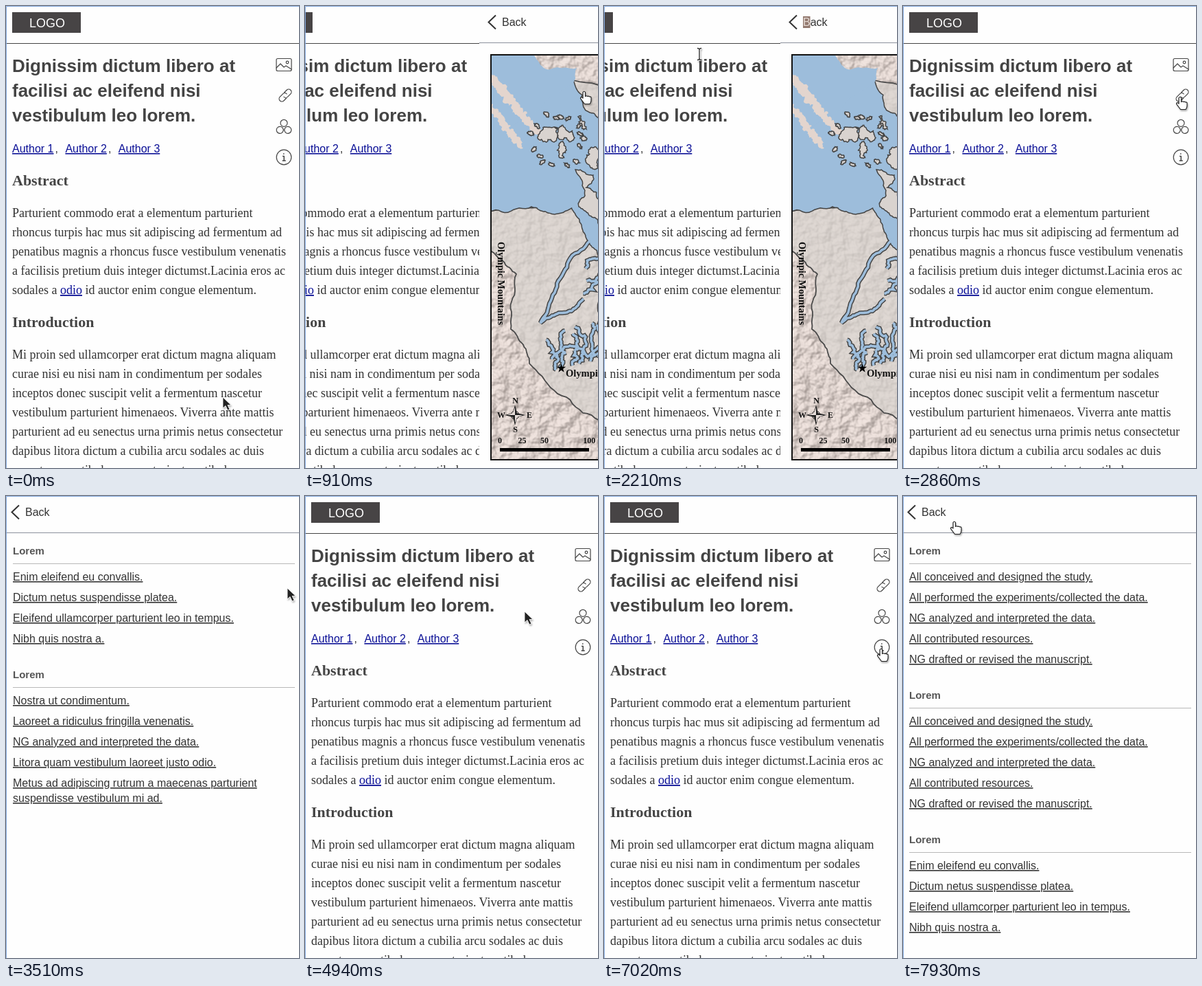
An HTML page that plays this animation: 427 px wide and 672 px high, repeating every 8 s.

```html
<!DOCTYPE html>
<html lang="en">
<head>
<meta charset="utf-8">
<title>Article side panels</title>
<style>
html, body { margin: 0; width: 100%; height: 100%; overflow: hidden; background: #fefefe; }
svg { display: block; width: 100%; height: 100%; }
text { white-space: pre; }
.sans { font-family: "Liberation Sans", Arial, sans-serif; font-size: 16px; fill: #333; }
.serif { font-family: "Liberation Serif", Times, serif; font-size: 18px; fill: #333; }
.title { font-size: 26px; font-weight: bold; fill: #444; }
.section { font-size: 22px; font-weight: bold; fill: #444; }
.group { font-size: 15px; font-weight: bold; fill: #555; }
.item, .link { text-decoration: underline 1px; text-underline-offset: 2px; }
.link { fill: #0a0f96; }
.label { font-size: 14.5px; font-weight: bold; fill: #111; }
.small { font-size: 12px; text-anchor: middle; }
.icon { fill: none; stroke: #444; stroke-width: 1.2; stroke-linejoin: round; stroke-linecap: round; }
</style>
</head>
<body>
<svg id="stage" viewBox="0 0 427 672" xmlns="http://www.w3.org/2000/svg"></svg>
<script>
const LOOP = 8000, STEP = 130, SLIDE = 600, TRAVEL = 433, PARALLAX = 244;

const text = (x, y, cls, str, extra = '') => `<text x="${x}" y="${y}" class="${cls}" ${extra}>${str}</text>`;
const line = (x1, y, x2, color) => `<path d="M${x1} ${y}H${x2}" stroke="${color}"/>`;
const shape = (d, attrs) => `<path d="${d}" ${attrs}/>`;

// ---- article ----
function article() {
  const rows = (y, list) => list.map((s, i) => text(9, y + 28 * i, 'serif', s)).join('');
  const title = ['Dignissim dictum libero at', 'facilisi ac eleifend nisi', 'vestibulum leo lorem.'];
  const rings = [-90, 30, 150].map(a => `<circle cx="405" cy="170.3" r="5" transform="rotate(${a + 90} 405 177)"/>`).join('');
  return `<rect width="427" height="672" fill="#fefefe"/>
    <rect x="9" y="9" width="100" height="30" fill="#474445"/>
    ${text(34, 31, 'sans', 'LOGO', 'style="font-size:18px;fill:#fff"')}
    ${line(0, 54.5, 427, '#444')}
    ${title.map((s, i) => text(9, 96 + 36 * i, 'sans title', s)).join('')}
    ${[1, 2, 3].map((n, i) => text(9 + 77.4 * i, 213, 'sans link', 'Author ' + n)
      + (i < 2 ? text(71.5 + 77.4 * i, 213, 'sans', ',') : '')).join('')}
    ${text(9, 261, 'serif section', 'Abstract')}
    ${rows(307, [
      'Parturient commodo erat a elementum parturient',
      'rhoncus turpis hac mus sit adipiscing ad fermentum ad',
      'penatibus magnis a rhoncus fusce vestibulum venenatis',
      'a facilisis pretium duis integer dictumst.Lacinia eros ac',
      'sodales a <tspan class="link">odio</tspan> id auctor enim congue elementum.'])}
    ${text(9, 467, 'serif section', 'Introduction')}
    ${rows(513, [
      'Mi proin sed ullamcorper erat dictum magna aliquam',
      'curae nisi eu nisi nam in condimentum per sodales',
      'inceptos donec suscipit velit a fermentum nascetur',
      'vestibulum parturient himenaeos. Viverra ante mattis',
      'parturient ad eu senectus urna primis netus consectetur',
      'dapibus litora dictum a cubilia arcu sodales ac duis',
      'nascetur a vestibulum ac parturient vestibulum a'])}
    <g class="icon">
      <rect x="394" y="76.5" width="22" height="18" rx="2"/>
      <circle cx="410" cy="82" r="1.8"/>
      <path d="M394 90l6-6 5 5 3-2 8 5"/>
      <g transform="rotate(-45 407 130)">
        <path d="M405 134h-5a4 4 0 0 1 0-8h6a4 4 0 0 1 4 4"/>
        <path d="M409 126h5a4 4 0 0 1 0 8h-6a4 4 0 0 1-4-4"/>
      </g>
      ${rings}
      <circle cx="405" cy="220" r="10.8"/>
      <path d="M403.5 218.5h1.7v6.5m-2 0h4M404.8 214.8v.4" stroke-width="1.5"/>
    </g>`;
}

// ---- map ----
let seed = 7;
function rand() {
  seed = (seed * 16807) % 2147483647;
  return seed / 2147483647;
}
const spread = r => (rand() * 2 - 1) * r;

// Roughens a coarse outline by repeated midpoint displacement.
function coast(points, rough = 0.16, closed = true, levels = 4) {
  let pts = typeof points === 'string' ? points.split(' ').map(p => p.split(',').map(Number)) : points;
  for (let level = 0; level < levels; level++) {
    pts = pts.flatMap((a, i) => {
      if (!closed && i === pts.length - 1) return [a];
      const b = pts[(i + 1) % pts.length], k = spread(rough);
      return [a, [(a[0] + b[0]) / 2 + k * (b[1] - a[1]), (a[1] + b[1]) / 2 - k * (b[0] - a[0])]];
    });
  }
  return 'M' + pts.map(p => p.map(v => v.toFixed(1))).join(' ') + (closed ? 'Z' : '');
}
const stream = (points, rough) => coast(points, rough, false);

function blob(x, y, rx, ry = rx, tilt = 0) {
  const ring = Array.from({ length: 6 }, (_, i) => {
    const a = i * Math.PI / 3, u = rx * Math.cos(a), v = ry * Math.sin(a);
    return [x + u * Math.cos(tilt) - v * Math.sin(tilt), y + u * Math.sin(tilt) + v * Math.cos(tilt)];
  });
  return coast(ring, 0.34, true, 3);
}
const repeat = (n, fn) => Array.from({ length: n }, (_, i) => fn(i)).join('');

function terrain() {
  const region = coast('131,108 275,107 330,110 422,118 422,208 386,210 381,270 367,320 384,357 373,410 ' +
    '338,446 326,480 340,512 318,556 285,590 241,625 145,592 67,520 40,470 48,390 8,352 8,297 100,300', 0.1);
  const sea = coast('0,60 66,60 92,92 136,90 128,150 60,280 0,280', 0.1);
  const sound = coast('0,200 131,110 148,152 172,166 168,200 188,265 202,314 217,318 198,350 190,400 194,440 188,476 ' +
    '168,470 173,400 166,355 146,328 129,293 102,302 70,291 0,298', 0.11);

  // Narrow arms of the sea: one long hooked canal and a comb of southern inlets.
  const canal = stream('158,338 112,396 83,461 120,446 146,426', 0.1);
  const spine = stream('184,470 152,510 126,494 100,514', 0.15);
  const comb = repeat(6, i => {
    const x = 172 - 13 * i, y = 492 + 3 * i;
    return stream([[x, y], [x - 8 + spread(8), y - 28 - spread(12)]], 0.3) +
      stream([[x, y], [x - 5 + spread(6), y + 22]], 0.3);
  });
  const bays = repeat(3, i => stream([[170, 366 + 18 * i], [149 + spread(4), 382 + 18 * i]], 0.3));

  const islands = coast('134,238 160,246 150,264 172,286 197,328 188,343 166,310 139,292 148,276', 0.18) +
    blob(94, 187, 14, 12) + blob(119, 184, 16, 9, 0.5) + blob(114, 210, 7, 12) + blob(161, 221, 11, 15) +
    blob(180, 274, 3, 17, -0.25) + blob(181, 438, 4, 13) + blob(144, 170, 4, 12, -0.4) +
    repeat(16, i => {
      const a = i * 2.4, r = 30 + 12 * rand();
      return blob(110 + r * Math.cos(a), 193 + r * Math.sin(a), 5, 2.5, spread(1));
    });
  const northwest = repeat(7, i => blob(16 + 11 * i, 110 + 13 * i, 13, 7, 0.9)) +
    repeat(5, i => blob(14 + 9 * i, 150 + 12 * i, 11, 6, 0.8));
  const lakes = stream('207,374 213,396 208,414 213,430') +
    repeat(6, i => stream([[300 + 14 * i, 180 + 60 * i], [297 + 14 * i, 196 + 60 * i]]));
  const basin = coast('189,272 225,255 240,240 268,233 300,232 298,285 325,304 325,323 275,312 225,293 194,298', 0.13);
  const rivers = stream('190,276 228,281 242,268 300,263', 0.12) + stream('228,281 242,300 298,307 322,312', 0.12) +
    stream('190,276 190,298');

  const water = 'fill="#9dbddb"', land = 'fill="#d9d3cf" stroke="#444" stroke-width="1.5"';
  const arms = canal + spine + comb + bays;
  return shape(region, 'fill="#d8d3cf" fill-opacity=".68" stroke="#4a4a4a" stroke-width="1.8"') +
    shape(lakes, 'fill="none" stroke="#a9c6da" stroke-width="3"') +
    shape(sound, 'stroke="#444" stroke-width="3"') +
    shape(arms, 'fill="none" stroke="#444" stroke-width="6.6"') +
    shape(sea, water) + shape(sound, water) +
    shape(arms, 'fill="none" stroke="#9dbddb" stroke-width="3.6"') +
    shape(northwest, 'fill="#e3d5ce"') + shape(islands, land) +
    shape(basin, 'fill="#c5d6cb" fill-opacity=".85" stroke="#333"') +
    shape(rivers, 'fill="none" stroke="#2f5c9c" stroke-width="1.7"');
}

function inset() {
  return `<rect x="294.5" y="575.5" width="117" height="79" fill="#c9c8ca" stroke="#222"/>
    <g stroke="#222">
      ${shape(coast('302,590 318,594 322,579 406,583 408,640 362,640 330,652 307,630', 0.05), 'fill="#e2e2e4"')}
      ${shape(blob(327, 605, 15, 18), 'fill="#b5b5b7" stroke="#777"')}
      ${shape(blob(336, 595, 7, 4), 'fill="#888" stroke="none"')}
      ${shape(stream('322,580 326,592 321,604 325,618', 0.3), 'fill="none" stroke-width="4"')}
      ${shape(stream('394,599 364,603 366,630 388,632', 0.1), 'fill="none"')}
    </g>`;
}

function map() {
  const star = (x, y) => {
    const pts = Array.from({ length: 10 }, (_, i) => {
      const a = Math.PI * (i / 5 - 0.5), r = i % 2 ? 2.7 : 7;
      return [x + r * Math.cos(a), y + r * Math.sin(a)];
    });
    return shape(`M${pts.join(' ')}Z`, '');
  };
  const place = (x, y, str, extra) => text(x, y, 'serif label', str, extra);
  const city = (x, y, name) => star(x, y) + place(x + 3, y - 4, name);
  const small = (x, y, str) => text(x, y, 'serif label small', str);
  const turned = (x, y, angle, size, str, extra = '') =>
    place(0, 0, str, `transform="translate(${x} ${y}) rotate(${angle})" style="font-size:${size}px" ${extra}`);
  const italic = 'font-style="italic"';
  return `<g clip-path="url(#frame)">
      <rect x="11" y="71" width="408" height="590" fill="#e9d9d2"/>
      <rect x="11" y="71" width="408" height="590" filter="url(#relief)" opacity=".35"/>
      ${terrain()}
      ${city(177.5, 158.5, 'Bellingham')}${city(193.5, 400, 'Seattle')}
      ${star(113.5, 527)}${place(120, 539, 'Olympia')}
      ${place(213, 218, 'Stillaguamish River', italic)}${place(213, 234, 'Basin', italic)}
      ${turned(233, 262, -3, 13.5, 'North Fork', italic)}${turned(236, 283, 22, 13.5, 'South Fork', italic)}
      ${turned(402, 281, 90, 14.2, 'Cascade Mountains')}${turned(21, 343, 90, 14.2, 'Olympic Mountains')}
      <path d="M46 580l3 12 12 3-12 3-3 12-3-12-12-3 12-3Z" fill="#222"/>
      <circle cx="46" cy="595" r="6" fill="none" stroke="#222"/>
      <path d="M46 584v11h-11l8-3ZM46 606v-11h11l-8 3Z" fill="#e8dfdb"/>
      ${small(46.5, 578, 'N')}${small(46.5, 620, 'S')}${small(26, 599, 'W')}${small(67, 599, 'E')}
      <rect x="24" y="643" width="130" height="5"/>
      ${small(24, 636, '0')}${small(56.5, 636, '25')}${small(89, 636, '50')}${small(164, 636, '100 km')}
      ${inset()}
    </g>
    <rect x="11" y="71" width="407" height="589" fill="none" stroke="#111" stroke-width="2"/>`;
}

// ---- link lists ----
const LATIN = ['Enim eleifend eu convallis.', 'Dictum netus suspendisse platea.',
  'Eleifend ullamcorper parturient leo in tempus.', 'Nibh quis nostra a.'];
const DATA = 'NG analyzed and interpreted the data.';
const MIDDLE = ['All performed the experiments/collected the data.', DATA, 'All contributed resources.'];
const ORNARE = 'Parturient magna ullamcorper ornare in himenaeos.';
const ROLES = ['All conceived and designed the study.', ...MIDDLE, 'NG drafted or revised the manuscript.'];

function list(heading, groups) {
  let y = 85;
  return groups.map(items => {
    let out = text(9, y, 'sans group', heading) + line(9, y + 13.5, 420, '#b8b8b8');
    y += 38;
    for (const item of items) {
      item.split('\n').forEach((s, i) => {
        if (i) y += 22;
        out += text(9, y, 'sans item', s);
      });
      y += 30;
    }
    y += 22;
    return out;
  }).join('');
}

const MARK = `<g id="mark"><rect x="27" y="15" width="10.5" height="17" fill="#93796f"/>
  ${text(27, 29, 'sans', 'B', 'style="fill:#e6dcd6"')}</g>`;
const panel = (body, i) => `<g id="panel${i}"><rect x="-6" width="433" height="672" fill="#fefefe"/>
  <path d="M18 13.5L7.5 23.5L18 33.5" fill="none" stroke="#333" stroke-width="2"/>
  ${text(27, 29, 'sans', 'Back')}${line(-6, 53.5, 427, '#8b909c')}${body}</g>`;

const bodies = [
  MARK + map(),
  list('Lorem', [LATIN, ['Nostra ut condimentum.', 'Laoreet a ridiculus fringilla venenatis.', DATA,
    'Litora quam vestibulum laoreet justo odio.',
    'Metus ad adipiscing rutrum a maecenas parturient\nsuspendisse vestibulum mi ad.']]),
  list('Title', [[ORNARE, ...MIDDLE, ORNARE], LATIN, [...LATIN, ...LATIN.slice(0, 2)]]),
  list('Lorem', [ROLES, ROLES, LATIN])
];

const BEAM = 'M-3-8.5q3 0 3 2v13q0 2-3 2M3-8.5q-3 0-3 2m0 13q0 2 3 2';
const cursors = {
  arrow: '<path d="M0 0v16l4-3.5 3 6.5 3-1.3-3-6.2h5Z" fill="#222" stroke="#fff" stroke-width=".8"/>',
  hand: '<path d="M-2 1.500q2-2.500 3.500 0v6q2-1.500 3 0 2-1 3 .5 2.500-.5 2.500 1.500v4q0 2-2 5h-7.500q-3-4-6-8 0-2.500 2.500-1.500l1 1Z" fill="#fff" stroke="#222" stroke-width="1.2" stroke-linejoin="round"/>',
  beam: `<path d="${BEAM}" fill="none" stroke="#fff" stroke-width="3"/><path d="${BEAM}" fill="none" stroke="#222" stroke-width="1.3"/>`
};

const stage = document.getElementById('stage');
stage.innerHTML = `<defs>
    <clipPath id="frame"><rect x="11" y="71" width="407" height="589"/></clipPath>
    <filter id="relief" x="11" y="71" width="408" height="590" filterUnits="userSpaceOnUse" color-interpolation-filters="sRGB">
      <feTurbulence type="fractalNoise" baseFrequency=".06" numOctaves="3" seed="9"/>
      <feDiffuseLighting surfaceScale="7" lighting-color="#fffaf8"><feDistantLight azimuth="225" elevation="54"/></feDiffuseLighting>
    </filter>
    <filter id="shade" x="-50%" y="-50%" width="200%" height="200%"><feDropShadow dx="1" dy="2" stdDeviation="1.2" flood-opacity=".3"/></filter>
  </defs>
  <g id="article">${article()}</g>
  ${bodies.map(panel).join('')}
  <path d="M.5 672V.5H427" fill="none" stroke="#84a9de"/>
  <g id="cursor" filter="url(#shade)">${Object.entries(cursors).map(([k, s]) => `<g id="${k}">${s}</g>`).join('')}</g>`;

// ---- motion ----
const visits = [[650, 1867], [2927, 4250], [5330, 6340], [7050, 7930]];

// The pointer goes to each icon, rests beside it, then returns to the back link.
const stops = [{ t: 0, x: 316, y: 569 }];
const stay = (from, to, x, y) => stops.push({ t: from, x, y }, { t: to, x, y });
visits.forEach(([open, close], i) => {
  const y = 87 + 45 * i;
  stay(open - 100, open + 100, 404, y);
  stay(open + 400, Math.max(open + 400, close - 560), 410, Math.max(134, y));
  stay(close, close + 100, 75, 37);
});

const $ = id => document.getElementById(id);
const smooth = u => { u = Math.min(1, Math.max(0, u)); return u * u * (3 - 2 * u); };
const show = (el, on) => el.setAttribute('display', on ? 'inline' : 'none');
const move = (el, x, y = 0) => el.setAttribute('transform', `translate(${Math.round(x)} ${Math.round(y)})`);

function pointer(t) {
  const i = stops.findIndex(s => s.t > t), a = stops[i - 1], b = stops[i];
  const u = smooth((t - a.t) / (b.t - a.t));
  const v = b.x > a.x ? u * (2 - u) : u * u; // both directions follow one arc
  return [a.x + (b.x - a.x) * u, a.y + (b.y - a.y) * v];
}

function cursorKind(x, y, cover) {
  if (cover < 0.5 ? x > 390 : x < 80) return 'hand';
  return cover < 0.9 && x < 330 && y > 50 && y < 165 ? 'beam' : 'arrow';
}

function render(t) {
  let cover = 0;
  visits.forEach(([open, close], i) => {
    const shown = smooth((t - open) / SLIDE) - smooth((t - close) / SLIDE);
    cover = Math.max(cover, shown);
    show($('panel' + i), shown > 0);
    move($('panel' + i), TRAVEL * (1 - shown));
  });
  move($('article'), -PARALLAX * cover);
  show($('mark'), t > visits[0][1]);

  const [x, y] = pointer(t), kind = cursorKind(x, y, cover);
  move($('cursor'), x, y);
  for (const name in cursors) show($(name), name === kind);
}

let last = -1;
const start = performance.now();
function tick(now) {
  const t = Math.floor(Math.max(0, now - start) % LOOP / STEP) * STEP;
  if (t !== last) render(last = t);
  requestAnimationFrame(tick);
}
render(0);
requestAnimationFrame(tick);
</script>
</body>
</html>
```
